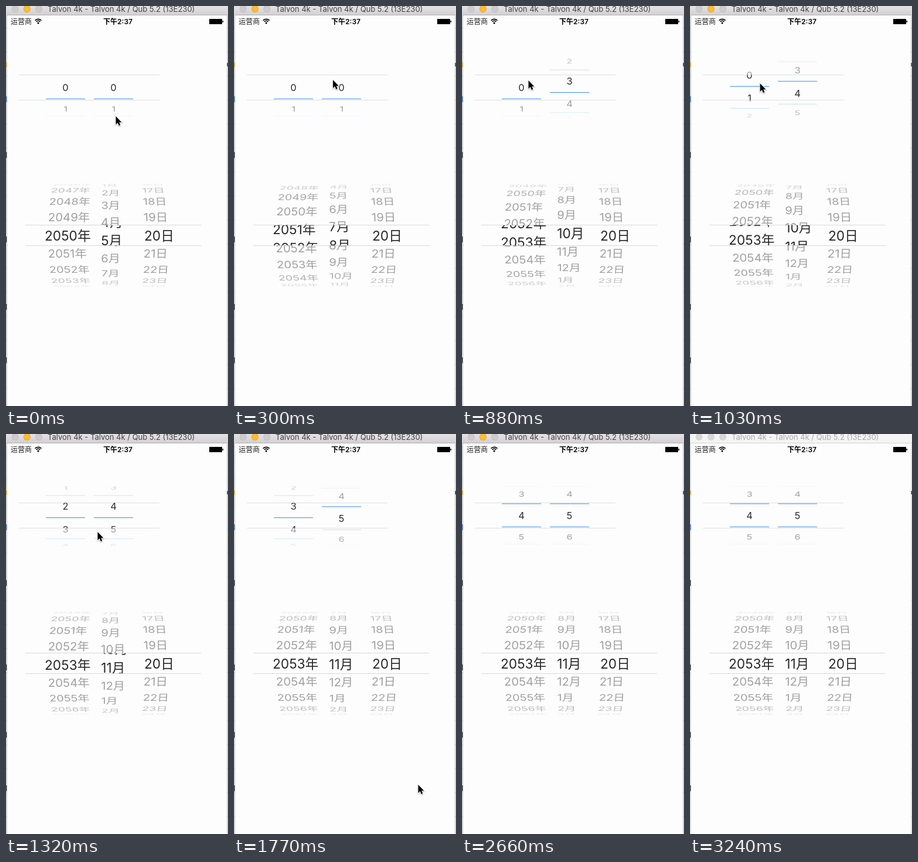
Recreate the animation shown at these times as an HTML page with a canvas. Size 379x682 px, loop 3340 ms.

```html
<!DOCTYPE html>
<html lang="zh">
<head>
<meta charset="utf-8">
<style>
  html, body { margin: 0; width: 100%; height: 100%; overflow: hidden; background: #fdfdfd; }
  canvas { display: block; }
</style>
</head>
<body>
<canvas id="stage" width="379" height="682"></canvas>
<script>
const ctx = document.getElementById('stage').getContext('2d');
const FONT = 'Inter, "Noto Sans CJK SC", "Noto Sans CJK", sans-serif';
const LOOP = 3340, BLUR_AT = 3240, CURSOR_END = 2200;
const TICK = 440 / 3; // the screen refreshes in even steps

// A spinning wheel that slows down and stops.
const coast = (from, to, duration, power) => t =>
  to + (from - to) * Math.max(0, 1 - t / duration) ** power;

// Monotone cubic through [time, value] keys.
function track(...keys) {
  const secant = keys.slice(1).map(([t, v], i) => (v - keys[i][1]) / (t - keys[i][0]));
  const slope = keys.map((_, i) => {
    const a = secant[i - 1], b = secant[i];
    if (a === undefined) return b;
    if (b === undefined) return 0;
    return a * b > 0 ? 2 * a * b / (a + b) : 0;
  });
  return t => {
    if (t <= keys[0][0]) return keys[0][1];
    const i = keys.findIndex(k => k[0] > t) - 1;
    if (i < 0) return keys[keys.length - 1][1];
    const [t0, v0] = keys[i], [t1, v1] = keys[i + 1];
    const h = t1 - t0, u = (t - t0) / h, w = 1 - u;
    return v0 * (1 + 2 * u) * w * w + v1 * u * u * (3 - 2 * u)
      + h * u * w * (w * slope[i] - u * slope[i + 1]);
  };
}

const year = coast(2050, 2053, 2100, 3.9);
const month = coast(4.72, 11, 2900, 5.45);
const left = track([950, 0], [1320, 2.4], [1770, 3.41], [2640, 4]);
const right = track([330, 0], [590, 1.72], [880, 3.28], [1320, 4.4], [2070, 5]);
const cursorX = track([0, 187], [590, 147], [880, 113], [1320, 156], [1760, 314], [2200, 340]);
const cursorY = track([0, 188], [440, 112], [590, 153], [880, 127], [1320, 167], [1760, 598], [2200, 690]);

function rect(color, x, y, w, h) {
  ctx.fillStyle = color;
  ctx.fillRect(x, y, w, h);
}

function disc(color, x, y, r) {
  ctx.fillStyle = color;
  ctx.beginPath();
  ctx.arc(x, y, r, 0, 7);
  ctx.fill();
}

function text(str, x, y, size, color, weight = 400, align = 'left') {
  ctx.font = `${weight} ${size}px ${FONT}`;
  ctx.textAlign = align;
  ctx.fillStyle = color;
  ctx.fillText(str, x, y);
}

// Draws the selected band and the faded parts above and below it.
function banded(top, bandTop, bandBottom, bottom, draw) {
  const part = (from, to, inBand) => {
    ctx.save();
    ctx.beginPath();
    ctx.rect(0, from, 379, to - from);
    ctx.clip();
    draw(inBand);
    ctx.restore();
  };
  part(top, bandTop, false);
  part(bandTop, bandBottom, true);
  part(bandBottom, bottom, false);
}

function eachRow(pos, step, draw) {
  for (let k = Math.floor(pos) - 4; k <= pos + 5; k++) {
    const angle = (k - pos) * step;
    if (Math.abs(angle) < 1.5) draw(k, Math.sin(angle), Math.cos(angle));
  }
}

function dateColumn(pos, xBand, xRest, label) {
  banded(303, 374, 408, 479, inBand => eachRow(pos, Math.PI / 9, (k, sin, cos) => {
    const y = 391.3 + 91 * sin / (1 + 0.04 * (1 - cos));
    const size = inBand ? 22.7 : 20.5;
    const shrink = 1 / (1 + 0.11 * (1 - cos));
    const dx = (inBand ? xBand : xRest) - 183;
    ctx.save();
    ctx.globalAlpha = inBand ? 1 : 0.43 * Math.min(1, cos * 1.4);
    ctx.transform(shrink, 0, -(dx + 25) * 0.11 * sin / 91, cos, 183 + dx * shrink, y);
    text(label(k), 0, size * 0.365, size, '#282828');
    ctx.restore();
  }));
}

function numberColumn(pos, x) {
  const STEP = 42 * Math.PI / 180, R = 55, CY = 139;
  banded(89, 117.5, 160.5, 191, inBand => {
    const row = (strength, draw) => (k, sin, cos) => {
      if (k < 0) return;
      ctx.save();
      ctx.globalAlpha = inBand ? 1 : strength * Math.min(0.45, 0.8 * cos * cos);
      ctx.translate(x, CY + R * sin);
      ctx.scale(1, cos);
      draw(k);
      ctx.restore();
    };
    eachRow(pos, STEP, row(1, k => text(k, 0, 6.1, 16.5, '#2c2c2c', 400, 'center')));
    eachRow(pos - 0.49, STEP, row(0.7, () => rect('#4296f7', -33.5, -0.55, 67, 1.1)));
  });
}

function titleBar(active) {
  const shade = ctx.createLinearGradient(0, 0, 0, 15);
  shade.addColorStop(0, active ? '#e4e2e4' : '#f6f6f6');
  shade.addColorStop(1, active ? '#d2d0d2' : '#f4f4f4');
  rect(shade, 1, 0, 377, 15);
  rect(active ? '#b4b2b4' : '#d4d4d4', 1, 15, 377, 1);
  for (let i = 0; i < 3; i++) {
    const lit = active && i === 1, x = 15.5 + 20.3 * i;
    disc(lit ? '#dfa023' : active ? '#bcbabc' : '#d0d0d0', x, 5, 6);
    disc(lit ? '#fdbd2e' : active ? '#cdcbcd' : '#d8d8d8', x, 5, 5.3);
  }
  text('Talvon 4k - Talvon 4k / Qub 5.2 (13E230)', 71, 10, 13, active ? '#444' : '#a9a9a9');
}

function statusBar() {
  text('运营商', 8, 30.5, 12, '#222');
  text('下午2:37', 191, 30.5, 12, '#000', 600, 'center');
  ctx.strokeStyle = '#000';
  ctx.lineWidth = 1.6;
  for (const r of [4.6, 7.6]) {
    ctx.beginPath();
    ctx.arc(55, 30, r, -Math.PI * 0.76, -Math.PI * 0.24);
    ctx.stroke();
  }
  disc('#000', 55, 29, 1.6);
  rect('#000', 347, 22, 22, 9);
  rect('#000', 369.5, 25, 1.5, 3);
}

// Slivers of the windows behind.
function surroundings(active) {
  const edge = active ? '#b8b8b8' : '#d0d0d0';
  rect(active ? '#dcdcdc' : '#e8e8e8', 0, 0, 379, 682);
  for (let y = 37; y < 682; y += 41) rect(edge, 0, y, 379, 1);
  rect('#e0b040', 0, 96, 2, 8);
  rect('#4a80d0', 0, 154, 2, 10);
  for (const y of [249, 393, 508, 599]) rect('#333', 0, y, 1.5, 10);
  rect('#444', 377, 97, 2, 6);
  rect(edge, 1.5, 16, 376, 666);
  rect('#fdfdfd', 2, 16, 375, 666);
}

function cursor(x, y) {
  ctx.save();
  ctx.translate(x, y);
  ctx.shadowColor = 'rgba(0,0,0,.35)';
  ctx.shadowBlur = 2;
  ctx.shadowOffsetY = 1;
  const arrow = new Path2D('M0.5 0V14L3.7 11L5.8 16L8.3 15L6.2 10.2H10.3Z');
  ctx.lineWidth = 1.6;
  ctx.strokeStyle = '#fff';
  ctx.stroke(arrow);
  ctx.shadowColor = 'transparent';
  ctx.fillStyle = '#000';
  ctx.fill(arrow);
  ctx.restore();
}

function render(now) {
  const time = now % LOOP;
  const t = Math.floor(time * 3 / 440) * TICK;
  const active = time < BLUR_AT;
  surroundings(active);
  titleBar(active);
  statusBar();

  for (const y of [117, 160]) rect('#dfdfdf', 22, y, 240, 1);
  numberColumn(left(t), 101.5);
  numberColumn(right(t), 183.5);

  for (const y of [373, 408]) rect('#d9d9d9', 33, y, 300, 1);
  dateColumn(year(t), 66, 71, k => k + '年');
  dateColumn(month(t), 162.2, 162, k => (k + 11) % 12 + 1 + '月');
  dateColumn(20, 236, 235.2, k => k + '日');

  if (t < CURSOR_END - 1) cursor(cursorX(t), cursorY(t));
}

const start = performance.now();
(function loop() {
  render(performance.now() - start);
  requestAnimationFrame(loop);
})();
</script>
</body>
</html>
```
